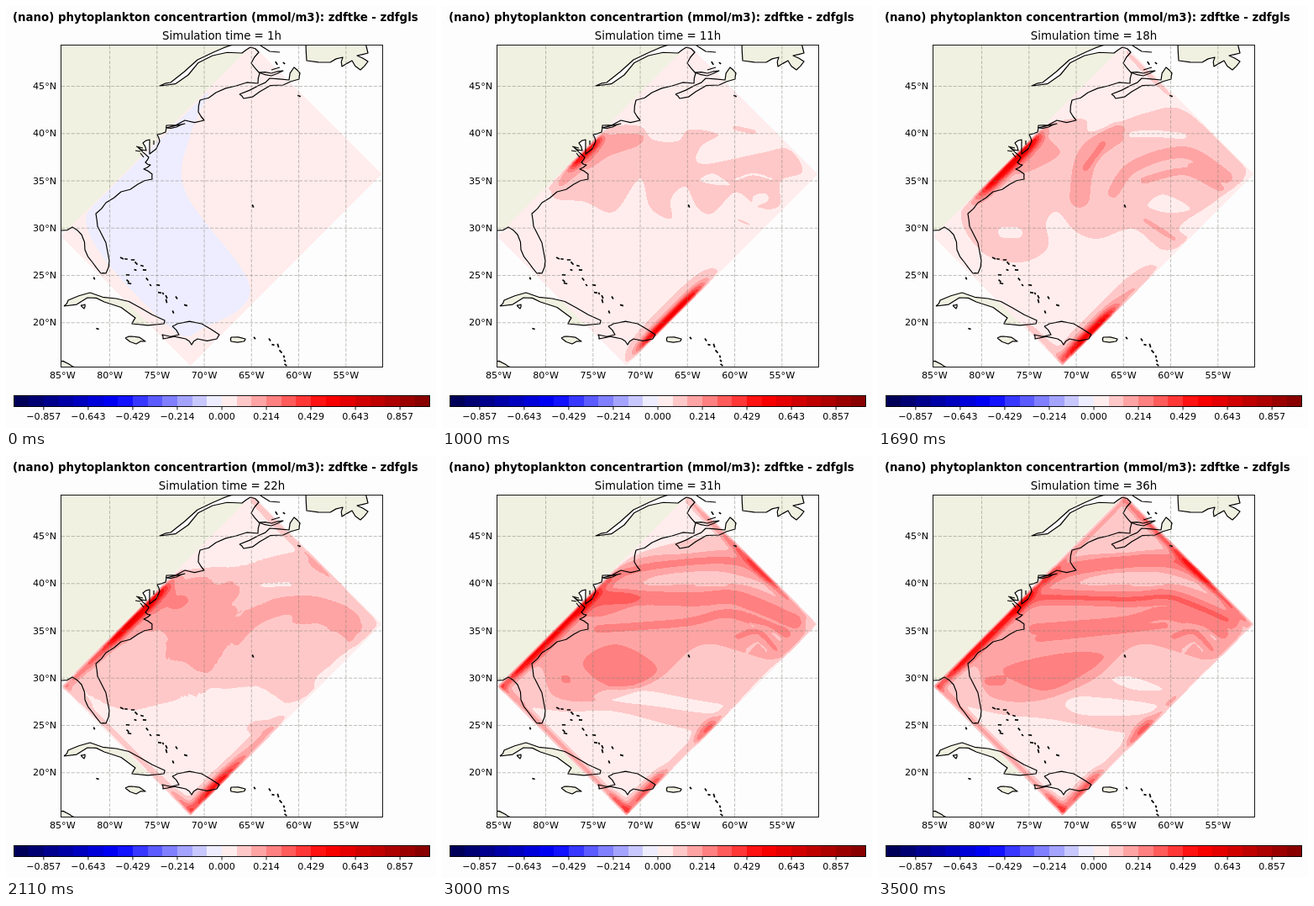
Recreate the animation shown at these times as an HTML page with a canvas. Size 512 px wide and 502 px high, loop 3610 ms.

```html
<!DOCTYPE html>
<html lang="en">
<head>
<meta charset="utf-8">
<title>Phytoplankton concentration difference</title>
<style>
html, body { margin: 0; width: 100%; height: 100%; overflow: hidden; background: #fdfdfe; }
canvas { display: block; }
</style>
</head>
<body>
<canvas id="stage" width="512" height="502"></canvas>
<script>
const ctx = document.getElementById('stage').getContext('2d');
const LOOP = 3610, STEPS = [0, 110, 190, 310, 390];
const X0 = 66, Y0 = 46.5, X1 = 448.5, Y1 = 429;
const OX = 65, OY = 46, N = 384;
const LONG = 322, WIDE = 217.5;
const BAND = 28, UNIT = 40;
const FONT = '"DejaVu Sans", Verdana, sans-serif';

const newCanvas = (w, h) => Object.assign(document.createElement('canvas'), { width: w, height: h });

let seed = 7;
const random = () => (seed = seed * 16807 % 2147483647) / 2147483647;

// Blue-white-red palette, in flat bands
function bandColor(i) {
  const x = (i + 0.5) / BAND, c = v => Math.round(255 * v);
  if (x < 0.25) return [0, 0, c(0.3 + 2.8 * x)];
  if (x < 0.5) return [c(4 * x - 1), c(4 * x - 1), 255];
  if (x < 0.75) return [255, c(3 - 4 * x), c(3 - 4 * x)];
  return [c(2.5 - 2 * x), 0, 0];
}
const COLORS = Array.from({ length: BAND }, (_, i) => bandColor(i));

/* ---------- concentration field ---------- */

const pad = newCanvas(N, N);
const pen = pad.getContext('2d', { willReadFrequently: true });
let bumps = [];

function curve(p, closed) {
  const n = p.length / 2;
  const at = i => {
    i = closed ? (i + n) % n : Math.max(0, Math.min(n - 1, i));
    return [p[2 * i] - OX, p[2 * i + 1] - OY];
  };
  pen.beginPath();
  pen.moveTo(...at(0));
  for (let i = 0; i < (closed ? n : n - 1); i++) {
    const [a, b, c, d] = [at(i - 1), at(i), at(i + 1), at(i + 2)];
    pen.bezierCurveTo(b[0] + (c[0] - a[0]) / 6, b[1] + (c[1] - a[1]) / 6,
      c[0] - (d[0] - b[0]) / 6, c[1] - (d[1] - b[1]) / 6, c[0], c[1]);
  }
}

// Red holds rises, blue holds dips; the wide blur lets bands grow and shrink smoothly
function paint(amp, draw) {
  const v = Math.round(Math.abs(amp) * UNIT / 2);
  pen.fillStyle = pen.strokeStyle = amp > 0 ? `rgb(${v},0,0)` : `rgb(0,0,${v})`;
  for (const r of [1.5, 8]) {
    pen.filter = `blur(${r}px)`;
    draw();
  }
}
function area(amp, ...p) { curve(p, true); paint(amp, () => pen.fill()); }
function streak(amp, width, ...p) {
  curve(p, false);
  pen.lineWidth = width;
  paint(amp, () => pen.stroke());
}
// Ridge along a side of the domain: height, centre, half length, thickness
const NW = 0, SE = 1, SW = 2, NE = 3;
function ridge(side, amp, mid, half, thick) { bumps.push([side, amp, mid, half, thick]); }

function place(i) {
  const x = i % N + OX + 0.5 - 66, y = Math.floor(i / N) + OY + 0.5 - 274;
  return [(x - y) * Math.SQRT1_2, (x + y) * Math.SQRT1_2];
}

function build(draw) {
  pen.filter = 'none';
  pen.globalCompositeOperation = 'source-over';
  pen.fillStyle = '#000';
  pen.fillRect(0, 0, N, N);
  pen.globalCompositeOperation = 'lighter';
  pen.lineCap = 'round';
  bumps = [];
  draw();
  const px = pen.getImageData(0, 0, N, N).data, out = new Float32Array(N * N);
  for (let i = 0; i < N * N; i++) {
    const [u, w] = place(i);
    if (u < 0 || w < 0 || u > LONG || w > WIDE) { out[i] = NaN; continue; }
    const depth = [w, WIDE - w, u, LONG - u];
    let v = (px[4 * i] - px[4 * i + 2]) / UNIT;
    for (const [side, amp, mid, half, thick] of bumps) {
      const d = (depth[side] - 4) / thick;
      if (d > 3) continue;
      const t = ((side < 2 ? u : w) - mid) / half;
      v += amp * Math.exp(-(t ** 4) - d * d);
    }
    out[i] = 0.5 + v * Math.min(1, (Math.min(...depth) + 1) / 4);
  }
  return out;
}

function hour1() {
  area(-1, 185,155, 245,92, 219,155, 214,222, 291,335, 235,383, 195,382, 95,255);
}
function hour6() {
  area(-1, 98,238, 150,245, 226,362, 190,375, 105,275);
  area(1, 174,168, 190,155, 250,150, 243,172, 211,184);
  area(1, 291,192, 315,197, 305,215, 291,233, 286,215);
  streak(1, 7, 337,202, 344,198);
  streak(1, 6, 386,202, 405,208);
  ridge(SE, 6, 104, 44, 5.5);
  ridge(SE, 0.8, 90, 40, 13);
}
function hour11() {
  area(1, 132,222, 188,152, 234,143, 250,159, 281,161, 294,147, 331,153, 308,167, 308,188, 380,175,
    412,170, 430,197, 403,208, 402,238, 376,240, 350,221, 322,247, 304,240, 290,214, 272,230,
    274,254, 248,240, 236,204, 205,245, 171,233);
  area(-1, 306,209, 322,199, 345,214);
  streak(-1, 5, 349,207, 370,200, 393,206);
  streak(-1, 13, 376,230, 383,228);
  area(1, 186,157, 238,152, 236,165, 200,178, 172,193);
  streak(1, 7, 348,145, 372,150);
  streak(1, 5, 352,254, 366,260);
  ridge(NW, 4.5, 145, 27, 6);
  ridge(NW, 1, 120, 38, 13);
  ridge(SE, 6, 77, 53, 5.5);
  ridge(SE, 1.5, 82, 72, 15);
}
function hour18() {
  area(1, 102,234, 188,150, 245,134, 254,151, 320,127, 367,126, 438,191, 404,230, 358,263, 371,278,
    340,290, 304,265, 262,277, 235,268, 213,244, 200,258, 202,288, 169,305, 122,291);
  area(-1, 320,238, 340,224, 373,241, 346,246);
  streak(-1, 9, 296,153, 330,152, 364,155);
  streak(-1, 14, 149,269, 166,270);
  area(1, 185,153, 216,170, 208,183, 165,199);
  streak(1, 24, 285,151, 254,172, 244,194, 240,228);
  streak(1, 10, 268,164, 258,179, 247,193);
  streak(1, 14, 280,222, 304,191, 366,174, 416,204);
  streak(1, 9, 316,208, 366,197, 409,218);
  streak(1, 6, 372,190, 409,206);
  streak(1, 7, 318,255, 354,278);
  ridge(NW, 6.5, 124, 52, 7.5);
  ridge(SE, 5.5, 48, 44, 7);
  ridge(SE, 1.7, 78, 80, 15);
  ridge(SW, 0.9, 195, 50, 7);
  ridge(NE, 0.8, 45, 45, 5);
}

// Parts that persist through the last hours
function rim(nw, ne, neMid) {
  ridge(NW, nw, 86, 91, 6.3);
  ridge(SE, 3.4, 36, 32, 8);
  ridge(SW, 1.9, 110, 130, 5);
  ridge(SW, 2.6, 207, 22, 7);
  ridge(NE, ne, neMid, neMid + 5, 5);
}
function swirl() {
  streak(1, 8, 352,215, 376,209, 398,231);
  streak(-2, 5, 368,201, 388,205, 402,218);
  streak(-1, 6, 364,231, 376,222, 387,232);
  streak(-1, 5, 304,154, 338,153);
}
const body = () => area(1, 88,256, 190,150, 234,122, 290,117, 365,114, 402,152, 330,137, 260,141, 242,155,
  362,155, 432,198, 398,242, 312,224, 256,266, 190,291, 134,286, 117,250);
const north = [200,147, 238,133, 347,125, 402,153];
const middle = [165,184, 192,169, 300,170, 350,168, 422,197];
const south = [185,206, 290,198, 345,188, 411,212];

function hour26() {
  area(1, 66,272, 190,150, 240,133, 310,117, 372,118, 447,195, 398,241, 341,295, 290,280, 243,278,
    260,302, 322,319, 290,329, 190,289, 145,302, 88,293);
  area(1, 122,222, 190,152, 250,135, 270,153, 248,179, 340,166, 405,175, 427,198, 412,216, 362,189,
    298,201, 264,240, 235,269, 198,254, 170,259, 180,220);
  streak(1, 11, 306,137, 340,127, 374,133);
  area(1, 165,180, 190,157, 241,147, 225,175, 190,192);
  area(1, 203,225, 240,240, 240,255, 210,245);
  area(1, 194,174, 229,161, 208,181);
  streak(1, 8, 320,175, 360,172, 414,195);
  streak(1, 12, 345,192, 373,193, 410,216);
  streak(1, 5, 363,193, 405,212);
  streak(1, 6, 346,231, 383,243);
  swirl();
  rim(6, 1.9, 70);
  ridge(SE, 2.1, 90, 66, 8);
}
function hour31() {
  area(1, 66,272, 190,150, 260,108, 360,103, 447,195, 385,258, 349,297, 317,328, 206,304, 145,304, 88,293);
  area(-1, 181,288, 215,275, 302,290, 345,298, 325,307, 248,297);
  body();
  streak(1, 10, ...north);
  streak(1, 17, ...middle);
  streak(1, 10, ...south);
  area(1, 167,247, 208,224, 257,254, 210,278);
  streak(1, 11, 146,265, 149,266);
  area(1, 165,184, 190,160, 240,168, 191,190);
  streak(1, 5, 352,190, 408,208);
  swirl();
  rim(5, 2.4, 90);
  ridge(SE, 2.2, 137, 17, 8);
  ridge(SE, 1, 105, 80, 7);
}
function hour36() {
  area(1, 60,272, 292,40, 310,52, 455,200, 375,272, 320,328, 205,313, 140,306, 80,288);
  area(-1, 222,296, 245,286, 345,298, 310,308, 245,308);
  area(-1, 276,266, 300,262, 343,278, 305,278);
  body();
  streak(1, 15, ...north);
  streak(1, 7, ...north);
  streak(1, 17, ...middle);
  streak(1, 9, ...middle);
  streak(1, 12, ...south);
  streak(1, 5, ...south);
  streak(1, 7, 190,218, 342,202);
  area(1, 150,252, 227,234, 270,240, 212,277, 175,273);
  streak(1, 12, 130,268, 147,267);
  swirl();
  rim(4.6, 3, 105);
  ridge(NW, 1.2, 245, 80, 4);
  ridge(SE, 2.3, 135, 20, 8);
  ridge(SE, 1, 120, 90, 7);
}

const HOURS = [1, 6, 11, 18, 26, 31, 36];
const fields = [hour1, hour6, hour11, hour18, hour26, hour31, hour36].map(build);
const sheet = newCanvas(N, N), sheetCtx = sheet.getContext('2d');
const image = sheetCtx.createImageData(N, N);

function renderField(hour) {
  let k = 0;
  while (k < HOURS.length - 2 && hour >= HOURS[k + 1]) k++;
  const s = (hour - HOURS[k]) / (HOURS[k + 1] - HOURS[k]);
  const a = fields[k], b = fields[k + 1];
  for (let i = 0; i < a.length; i++) {
    const v = a[i] + (b[i] - a[i]) * s;
    if (v !== v) continue;
    const c = COLORS[Math.max(0, Math.min(BAND - 1, 14 + Math.floor(v)))];
    image.data.set(c, 4 * i);
    image.data[4 * i + 3] = 255;
  }
  sheetCtx.putImageData(image, 0, 0);
}

/* ---------- map ---------- */

// Adds a displaced point inside each segment, for a ragged shore
function ragged(p, amount = 0.14) {
  const out = [p[0], p[1]];
  for (let i = 2; i < p.length; i += 2) {
    const [x, y, dx, dy] = [p[i - 2], p[i - 1], p[i] - p[i - 2], p[i + 1] - p[i - 1]];
    const k = (random() - 0.5) * 2 * amount;
    out.push(x + dx / 2 - dy * k, y + dy / 2 + dx * k, p[i], p[i + 1]);
  }
  return out;
}

const florida = [60,271, 66,267, 79,263, 90,272, 94,290, 103,305, 113,318, 119,318, 123,303, 109,262,
  107,247, 119,234, 137,221, 157,212, 174,206, 174,200, 164,194, 172,189, 166,186, 170,180, 157,168,
  167,172, 163,163, 171,159, 171,176, 183,161, 180,153, 190,150, 191,143];
const maine = [191,142, 213,136, 236,136, 229,126, 231,112, 250,103, 274,95, 300,92, 302,80, 292,68,
  301,55, 291,49, 281,56, 246,59, 217,82, 183,95, 196,91, 228,64, 247,55, 273,45];
const mainland = [...ragged(florida), ...ragged(maine), 60, 40];
const islands = [];
const island = (...p) => islands.push(ragged([...p, p[0], p[1]]));
island(278,105, 283,110, 302,102, 330,94, 349,87, 350,80, 343,73, 337,88, 314,86, 302,94);
island(301,79, 316,80, 330,77, 316,83);
island(357,44, 358,65, 386,67, 401,61, 400,72, 412,65, 422,76, 431,66, 418,59, 431,56, 428,44);
island(69,357, 74,350, 100,341, 131,348, 160,359, 189,374, 188,378, 150,378, 154,371, 117,352, 97,347);
island(89,356, 94,355, 93,360);
island(142,395, 150,393, 166,399, 155,402);
island(198,381, 204,378, 233,378, 254,391, 251,396, 228,396, 221,403, 214,396, 187,396, 186,391, 206,391);
island(268,394, 285,396, 283,399, 268,399);
island(60,423, 75,426, 82,430, 60,436);
island(190,145, 213,140, 203,144);

// Small cays, each a short stroke leaning down to the right
const cays = [105,324, 138,300, 143,301, 151,302, 155,306, 145,320, 147,330, 145,327, 154,314, 162,309,
  165,314, 168,325, 172,332, 181,332, 183,341, 187,342, 191,346, 191,351, 203,347, 214,356, 199,364,
  109,384, 294,238, 349,107, 296,395, 314,397, 318,403, 324,404, 327,411, 331,417, 332,422, 333,427,
  322,68, 331,68];
const inlets = [[164,180, 160,175], [155,167, 163,169], [154,172, 160,173], [176,160, 176,165],
  [303,47, 314,54, 326,55], [316,76, 326,73]];

function trace(c, p) {
  for (let i = 0; i < p.length; i += 2) {
    if (i) c.lineTo(p[i], p[i + 1]);
    else c.moveTo(p[i], p[i + 1]);
  }
}
function clipMap(c) {
  c.beginPath();
  c.rect(X0, Y0, X1 - X0, Y1 - Y0);
  c.clip();
}

const under = newCanvas(512, 502), over = newCanvas(512, 502);

function drawUnder(c) {
  c.fillStyle = '#fdfdfe';
  c.fillRect(0, 0, 512, 502);
  clipMap(c);
  c.fillStyle = '#f1f1e1';
  for (const p of [mainland, ...islands]) {
    c.beginPath();
    trace(c, p);
    c.fill();
  }
}

function label(c, text, x, y, align, size = 11.11, weight = '') {
  c.font = `${weight} ${size}px ${FONT}`;
  c.textAlign = align;
  c.fillStyle = '#000';
  c.fillText(text, x, y);
}

function drawOver(c) {
  const lonX = d => 67.3 + (85 - d) * 11.25, latY = d => 95.5 + (45 - d) * 11.25;
  c.save();
  clipMap(c);
  c.lineJoin = 'round';
  c.lineWidth = 1.2;
  c.strokeStyle = '#000';
  c.beginPath();
  for (const p of [mainland, ...islands, ...inlets]) trace(c, p);
  c.stroke();
  c.lineWidth = 1.7;
  c.beginPath();
  for (let i = 0; i < cays.length; i += 2) {
    const a = random() * 1.3, r = 1.3 + random();
    const dx = r * Math.cos(a), dy = r * Math.sin(a);
    trace(c, [cays[i] - dx, cays[i + 1] - dy, cays[i] + dx, cays[i + 1] + dy]);
  }
  c.stroke();
  c.strokeStyle = 'rgba(128,128,118,.5)';
  c.lineWidth = 1;
  c.setLineDash([4.1, 1.8]);
  c.beginPath();
  for (let d = 80; d >= 55; d -= 5) trace(c, [lonX(d), Y1, lonX(d), Y0]);
  for (let d = 20; d <= 45; d += 5) trace(c, [X0, latY(d), X1, latY(d)]);
  c.stroke();
  c.restore();

  c.strokeStyle = '#000';
  c.lineWidth = 0.9;
  c.strokeRect(65.5, 46.5, 383, 383);
  for (let d = 85; d >= 55; d -= 5) label(c, d + '°W', lonX(d), 443, 'center');
  for (let d = 20; d <= 45; d += 5) label(c, d + '°N', 60, latY(d) + 3.5, 'right');

  const left = 9.5, width = 495, step = width / BAND;
  COLORS.forEach((rgb, i) => {
    c.fillStyle = `rgb(${rgb})`;
    c.fillRect(Math.round(left + i * step), 463, Math.ceil(step), 14);
  });
  c.strokeRect(left, 463.5, width, 13);
  for (let i = -12; i <= 12; i += 3) {
    const x = left + (i + 14) * step;
    c.beginPath();
    trace(c, [x, 477, x, 480.5]);
    c.stroke();
    label(c, (i < 0 ? '−' : '') + Math.abs(i / 14).toFixed(3), x, 492, 'center');
  }
  label(c, '(nano) phytoplankton concentrartion (mmol/m3): zdftke - zdfgls', 8, 18, 'left', 13.333, 'bold');
}

drawUnder(under.getContext('2d'));
drawOver(over.getContext('2d'));

function draw(hour) {
  renderField(hour);
  ctx.drawImage(under, 0, 0);
  ctx.save();
  clipMap(ctx);
  ctx.drawImage(sheet, OX, OY);
  ctx.restore();
  ctx.drawImage(over, 0, 0);
  label(ctx, `Simulation time = ${hour}h`, 257, 39.5, 'center', 13.333);
}

function hourAt(t) {
  const k = Math.min(7, Math.floor(t / 500)), r = t - 500 * k;
  return Math.min(36, 5 * k + STEPS.filter(s => r >= s).length);
}

let shown = 0;
const start = performance.now();
function tick(now) {
  const hour = hourAt(Math.max(0, now - start) % LOOP);
  if (hour !== shown) draw(shown = hour);
  requestAnimationFrame(tick);
}
draw(shown = 1);
requestAnimationFrame(tick);
</script>
</body>
</html>
```
